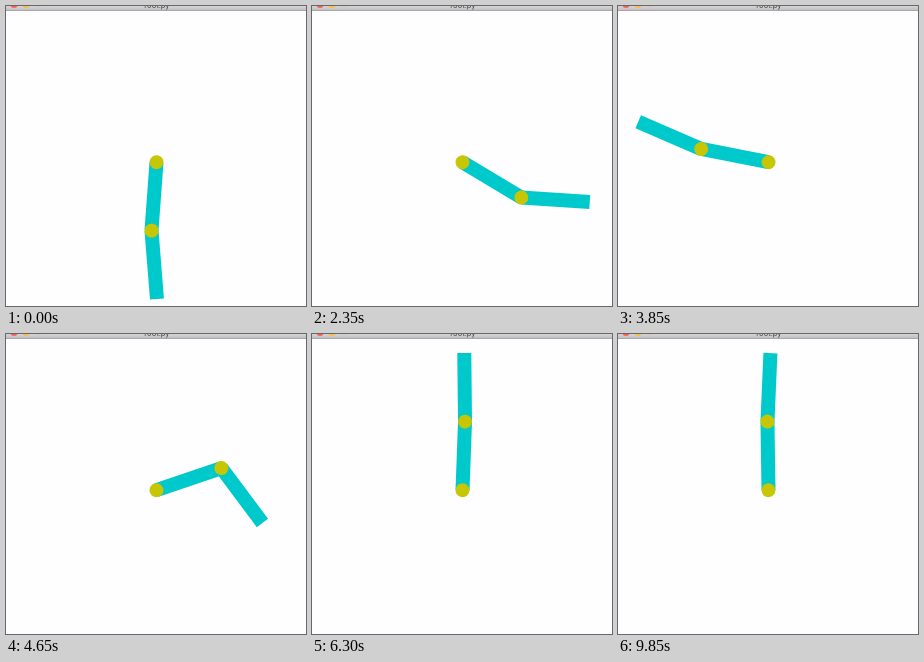
An HTML page for the animation above (9900 ms loop, 300x300 px).

```html
<!DOCTYPE html>
<html>
<head>
<meta charset="utf-8">
<style>
html, body { margin: 0; width: 100%; height: 100%; overflow: hidden; background: #fefdff; }
svg { display: block; width: 300px; height: 300px; }
</style>
</head>
<body>
<svg viewBox="0 0 300 300">
  <defs>
    <linearGradient id="bar" x2="0" y2="1">
      <stop stop-color="#d6d4d6"/><stop offset="1" stop-color="#c2c0c2"/>
    </linearGradient>
    <g id="link">
      <rect y="-7" width="68.6" height="14" fill="#00c9cb"/>
      <circle r="7" fill="#c6c603"/>
    </g>
  </defs>
  <rect width="300" height="4" fill="url(#bar)"/>
  <rect y="4" width="300" height="1" fill="#a9a7a9"/>
  <circle cx="8" cy="-1.5" r="3.6" fill="#fc5b57"/>
  <circle cx="20" cy="-1.5" r="3.6" fill="#fdbc40"/>
  <circle cx="32" cy="-1.5" r="3.6" fill="#d0ccc8"/>
  <text x="151" y="2" font-family="Inter, sans-serif" font-size="7.6" fill="#444" text-anchor="middle">root.py</text>
  <use id="upper" href="#link"/>
  <use id="lower" href="#link"/>
</svg>
<script>
const LOOP = 9900, STEP = 50, LENGTH = 68.6, PIVOT = [150.5, 156.2];
const upper = document.getElementById('upper');
const lower = document.getElementById('lower');

// Swing-up: time in ms, then each link's angle from straight down
const poses = [
  [0, -.073, .08], [500, .12, .39], [1000, .1, -.65], [1400, -.228, -1.068],
  [2000, 1, -.86], [2150, 1.32, .1], [2350, 1.03, 1.506], [2650, 0, 1.5],
  [3000, -1.33, -.4], [3250, -1.03, -1.05], [3850, -1.765, -1.979],
  [4000, -1.97, -2.42], [4400, 0, -.85], [4650, 1.9, .641], [5000, 2.76, 1.83]
];
const last = poses.length - 1, SETTLE = poses[last][0];

function slope(i, k) {
  const a = poses[Math.max(i - 1, 0)], b = poses[Math.min(i + 1, last)];
  return (b[k] - a[k]) / (b[0] - a[0]);
}

// Cubic Hermite curve through the poses
function swing(t, k) {
  const i = poses.findIndex(p => p[0] > t) - 1;
  const a = poses[i], b = poses[i + 1], span = b[0] - a[0], u = (t - a[0]) / span, v = 1 - u;
  return v * v * (1 + 2 * u) * a[k] + u * u * (3 - 2 * u) * b[k]
    + u * v * span * (v * slope(i, k) - u * slope(i + 1, k));
}

// Balancing: both links decay towards upright
function balance(t) {
  const slow = Math.exp((SETTLE - t) / 640), fast = Math.exp((SETTLE - t) / 300);
  return [3.157 - .397 * slow, 3.098 + .6 * slow - 1.868 * fast];
}

function place(link, x, y, angle) {
  link.setAttribute('transform', `translate(${x} ${y}) rotate(${90 - angle * 180 / Math.PI})`);
}

function draw() {
  const t = Math.floor(performance.now() % LOOP / STEP) * STEP;
  const [a, b] = t < SETTLE ? [swing(t, 1), swing(t, 2)] : balance(t);
  const [x, y] = PIVOT;
  place(upper, x, y, a);
  place(lower, x + LENGTH * Math.sin(a), y + LENGTH * Math.cos(a), b);
  requestAnimationFrame(draw);
}
draw();
</script>
</body>
</html>
```
